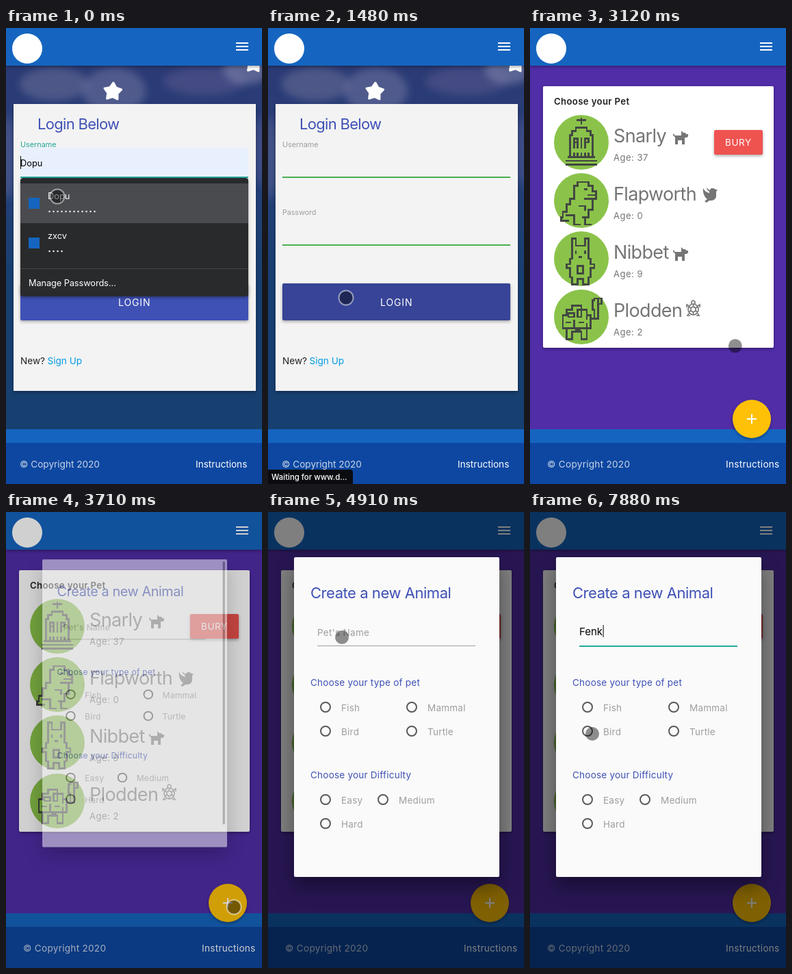
An HTML page for the animation above (8000 ms loop, 374 by 666 pixels).

```html
<!DOCTYPE html>
<html lang="en">
<head>
<meta charset="utf-8">
<title>Pet app</title>
<style>
html, body { margin: 0; width: 100%; height: 100%; overflow: hidden; background: #0d47a1; }
svg { display: block; width: 374px; height: 666px; }
text { font-family: Inter, Roboto, sans-serif; white-space: pre; }
.lift { filter: drop-shadow(0 2px 2px rgba(0,0,0,.32)); }
.high { filter: drop-shadow(0 14px 14px rgba(0,0,0,.4)); }
.pixel { fill: none; stroke: #424842; stroke-linecap: square; shape-rendering: crispEdges; }
.dots { fill: none; stroke-width: 2.7; stroke-linecap: round; stroke-dasharray: 0 6; }
</style>
</head>
<body>
<svg id="stage" viewBox="0 0 374 666"></svg>
<script>
const LOOP = 8000, STEP = 148.5;
const INDIGO = '#3f51b5', TEAL = '#26a69a', GREEN = '#4caf50';

const rect = (x, y, w, h, fill, extra = '') =>
  `<rect x="${x}" y="${y}" width="${w}" height="${h}" fill="${fill}" ${extra}/>`;
const text = (x, y, size, fill, str, spacing = 0, extra = '') =>
  `<text x="${x}" y="${y}" font-size="${size}" fill="${fill}" letter-spacing="${spacing}" ${extra}>${str}</text>`;
const group = (id, body, extra = '') => `<g id="${id}" ${extra}>${body}</g>`;
const dots = (x, y, n, color) =>
  `<path class="dots" stroke="${color}" d="M${x} ${y}h${(n - 1) * 6 + .1}"/>`;
const blob = (x, y, rx, ry, fill, opacity) =>
  `<ellipse cx="${x}" cy="${y}" rx="${rx}" ry="${ry}" fill="${fill}" opacity="${opacity}"/>`;

function star(x, y, r) {
  let d = '';
  for (let i = 0; i < 10; i++) {
    const a = i * Math.PI / 5 - 1.5, q = i % 2 ? r * .58 : r;
    d += `${i ? 'L' : 'M'}${(x + q * Math.cos(a)).toFixed(1)} ${(y + q * Math.sin(a)).toFixed(1)}`;
  }
  return `<path d="${d}z" fill="#fff" stroke="#fff" stroke-width="3" stroke-linejoin="round"/>`;
}

const footer = (left, right, spacing) =>
  text(left, 642, 13.6, '#c9d5e8', '© Copyright 2020', spacing) +
  text(right, 642, 13.6, '#fff', 'Instructions', spacing);

// Login page
const sky = rect(0, 55, 374, 531, 'url(#night)') +
  `<g filter="url(#soft)">` +
  blob(70, 82, 50, 24, '#7a7c9f', .45) + blob(158, 92, 46, 34, '#8a8bb0', .4) +
  blob(290, 78, 60, 20, '#55588e', .6) + blob(352, 60, 34, 22, '#8d90b4', .5) +
  blob(2, 190, 14, 60, '#5f6594', .5) + blob(372, 180, 12, 50, '#4d568f', .6) + '</g>' +
  star(156, 93, 13) + star(362, 52, 13);

const menu =
  rect(21, 219, 333, 173, '#292a2c', 'rx="4" class="lift"') +
  rect(21, 227, 333, 58, '#4a4b4f') + rect(21, 351, 333, 1, '#434448') +
  rect(33, 248, 16, 16, '#1565c0') + rect(33, 306, 16, 16, '#1565c0') +
  text(61, 250, 12.8, '#fff', 'Dopu') + dots(63.5, 268, 12, '#e4e4e4') +
  text(61, 308, 12.8, '#fff', 'zxcv') + dots(63.5, 326, 4, '#e4e4e4') +
  text(33, 377, 12.8, '#fff', 'Manage Passwords…', -.1);

const login = sky +
  rect(11, 111, 354, 419, '#f3f3f3', 'class="lift"') +
  text(46, 148, 22, INDIGO, 'Login Below', -.7) +
  text(21, 173.7, 10.9, '#9e9e9e', 'Username', -.05, 'id="userLabel"') +
  text(21, 272.7, 10.9, '#9e9e9e', 'Password', -.15) +
  group('userFill', rect(21, 175, 333, 42, '#e8f0fe') + text(21, 202, 12.8, '#000', 'Dopu')) +
  group('passFill', rect(21, 274, 333, 42, '#e8f0fe') + dots(23, 297, 12, '#000')) +
  rect(21, 187, 1, 19, '#000', 'id="userCaret"') +
  rect(21, 217, 333, 2, GREEN, 'id="userLine"') + rect(21, 316, 333, 2, GREEN) +
  rect(21, 373, 333, 54, INDIGO, 'id="loginBtn" rx="2" class="lift"') +
  text(164, 406, 14, '#fff', 'LOGIN', .9) +
  text(21, 491, 13.6, '#212121', 'New?') + text(60.5, 491, 13.6, '#039be5', 'Sign Up') +
  group('menu', menu);

// Pet list
const art = [
  'M0-13v3M-2-12h4M-6 8V-4h1v-2h2v-2h6v2h2v2h1V8M-4 3v-5h2v2h-2M-2 1v2M0-2v5M2 3v-5h2v2h-2' +
  'M-4 6v1M-2 6v1M0 6v1M2 6v1M4 6v1M-7 8h14M-8 10h16M-8 12h16',
  'M-4-5v-3h2v-2h6v2h2v3h2v4h-6M2-6h1M4-3h3M6-1v6h-2v4h-3M-4-5v4h-2v3h-2v4h-2v3h-1v2h4' +
  'M-1 3h3v2M-8 8h4M-4 9v4h3M2 9v4h3',
  'M-5-5v-6h2v4h5v-4h2v6v5h1v3h2v2h-2v5h-1v4h-3v-3h-3v3h-3v-4h-1v-5h-2v-2h2v-3h1zM-3-4v1M2-4v1M-1-1h1M-2 4h3v4h-3z',
  'M-10 6v-7h2v-3h3v-2h5v2h3v3h2v7zM-7-2h3v2h-3zM-2-4h2v4h-2zM3-1v2M-8 3h2M-4 2v3M-1 3h2M3 4v1' +
  'M5 1h2v-5h-1v-5h1v-1h4v3h-2v8h-2M9-9v1M-8 7v5h3v-4h5v4h3v-5M-3 7h2'
];
const icons = {
  dog: '<path d="M0 5c1-1 2 0 2 1q0 1 1 1h9V0l3 3h3l1 2h3v2q0 3-3 3h-2v10h-4v-6H7v6H3V9Q0 8 0 5z"/>',
  dove: '<path d="M1 1c2 4 5 6 9 7V6c0-3 2-5 5-5 2 0 3 1 4 2h3l-2 3v6c0 4-3 7-7 7h-3l-4 3-3-2 4-3C3 14 0 8 1 1z"/>' +
    '<path d="M6 0c0 3 2 5 4 6V4z"/>',
  turtle: '<g fill="none" stroke="#757575" stroke-width="1.6"><ellipse cx="10.500" cy="14" rx="7.500" ry="8"/>' +
    '<path d="M10.500 10l3.500 2v4l-3.500 2-3.500-2v-4zM10.500 6v4M14 12l3-2M14 16l3 2M10.500 18v4M7 16l-3 2M7 12l-3-2"/>' +
    '<path d="M8 6V3q2.500-4 5 0v3M4 9L1 7v4M17 9l3-2v4M4 20l-2 3h4M17 20l2 3h-4"/></g>'
};
const pet = (i, name, age, icon, ix, iy) => {
  const y = 167 + 85 * i;
  return `<circle cx="75" cy="${y}" r="40" fill="#8bc34a"/>` +
    `<path class="pixel" transform="translate(75 ${y}) scale(2.7)" d="${art[i]}"/>` +
    text(122, y, 27, '#757575', name, -.65) + text(122, y + 27, 13, '#757575', 'Age: ' + age, .5) +
    `<g transform="translate(${ix} ${iy})" fill="#757575">${icons[icon]}</g>`;
};

const pets = rect(0, 55, 374, 531, '#512da8') +
  rect(19, 85, 337, 382, '#fff', 'rx="2" class="lift"') +
  text(35, 112, 13.2, '#212121', 'Choose your Pet', .35, 'font-weight="600"') +
  pet(0, 'Snarly', 37, 'dog', 209, 150) + pet(1, 'Flapworth', 0, 'dove', 252, 233) +
  pet(2, 'Nibbet', 9, 'dog', 209, 320) + pet(3, 'Plodden', 2, 'turtle', 228, 397) +
  rect(269, 149, 71, 36, '#ef5350', 'rx="2" class="lift"') +
  text(285, 172, 13.5, '#fff', 'BURY', .6);

const fab = '<circle cx="324" cy="571" r="28" fill="#ffc107" class="lift"/>' +
  rect(317, 570, 14, 2, '#fff') + rect(323, 564, 2, 14, '#fff');

// New animal dialog
const radio = (x, y, label) =>
  `<circle cx="${x}" cy="${y}" r="7" fill="none" stroke="#5a5a5a" stroke-width="2"/>` +
  text(x + 23, y + 5.7, 13.5, '#9e9e9e', label, .23);

const modal = rect(38, 66, 300, 467, '#fafafa', 'rx="2" class="high"') +
  text(62, 126, 22, INDIGO, 'Create a new Animal', -.45) +
  text(72, 181, 13.5, '#9e9e9e', "Pet's Name", .3, 'id="nameLabel"') +
  rect(72, 195, 231, 1, '#9e9e9e', 'id="nameLine"') +
  text(72, 180, 15, '#000', '', 0, 'id="name"') +
  rect(72, 165, 1, 18, '#000', 'id="caret"') +
  text(62, 253.7, 13.5, INDIGO, 'Choose your type of pet', .23) +
  radio(84, 285, 'Fish') + radio(210, 285, 'Mammal') +
  radio(84, 320, 'Bird') + radio(210, 320, 'Turtle') +
  text(62, 388.7, 13.5, INDIGO, 'Choose your Difficulty', .23) +
  radio(84, 420, 'Easy') + radio(168, 420, 'Medium') + radio(84, 455, 'Hard') +
  rect(331, 69, 3.5, 427, '#8a8a8a', 'id="scroll" rx="1.7"');

document.getElementById('stage').innerHTML =
  `<defs><linearGradient id="night" x2="0" y2="1"><stop stop-color="#2b3a74"/>
  <stop offset=".25" stop-color="#27407a"/><stop offset=".6" stop-color="#173f70"/>
  <stop offset="1" stop-color="#173f70"/></linearGradient>
  <filter id="soft" x="-20%" y="-20%" width="140%" height="140%"><feGaussianBlur stdDeviation="6"/></filter></defs>` +
  group('login', login) + group('pets', pets) +
  rect(0, 0, 374, 55, '#1565c0', 'class="lift"') +
  '<circle cx="31" cy="30" r="22" fill="#fff"/>' +
  [21, 26, 31].map(y => rect(336, y, 18, 2, '#fff')).join('') +
  rect(0, 586, 374, 20, '#1565c0') + rect(0, 606, 374, 60, '#0d47a1') +
  group('loginFoot', footer(20, 277, 0)) + group('petsFoot', footer(25, 286, .27) + fab) +
  group('status', '<path d="M0 645h120q4 0 4 4v17H0z" fill="#0b0c0f"/>' +
    text(5, 660, 11.4, '#fff', 'Waiting for www.d...', 0, 'font-weight="500"')) +
  rect(0, 0, 374, 666, '#000', 'id="shade"') + group('modal', modal) +
  '<circle id="pointer" fill="#000" fill-opacity=".44" stroke="#fff" stroke-opacity=".5"/>';

const el = {};
document.querySelectorAll('[id]').forEach(e => el[e.id] = e);

const set = (id, attrs) => { for (const k in attrs) el[id].setAttribute(k, attrs[k]); };
const show = (id, on) => { el[id].style.display = on ? '' : 'none'; };
const clamp = v => Math.max(0, Math.min(1, v));
const easeOut = (u, n) => 1 - (1 - u) ** n;
const within = (t, a, b) => t >= a && t < b;

// time, x, y
const path = [
  [0, 75, 246], [200, 75, 246], [650, 88, 315], [1030, 114, 394], [2400, 114, 394],
  [2670, 190, 222], [2820, 225, 211], [3000, 272, 370], [3260, 333, 577], [3720, 333, 577],
  [4250, 200, 320], [4600, 107, 167], [4720, 107, 169], [4890, 108, 183], [7000, 108, 183],
  [7280, 135, 222], [7430, 142, 252], [7650, 118, 297], [7860, 91, 324]
];
function pointerAt(t) {
  let i = 1;
  while (i < path.length - 1 && path[i][0] < t) i++;
  const a = path[i - 1], b = path[i], u = clamp((t - a[0]) / (b[0] - a[0]));
  return [a[1] + (b[1] - a[1]) * u, a[2] + (b[2] - a[2]) * u];
}

function draw(t) {
  const listed = t >= 1780, filled = t < 1330, focused = t < 1180;
  show('login', !listed); show('loginFoot', !listed);
  show('pets', listed); show('petsFoot', listed);
  show('menu', t < 140);
  show('userFill', filled);
  show('passFill', filled && t >= 140);
  show('userCaret', focused);
  set('userCaret', { x: t < 140 ? 21 : 54 });
  set('userLabel', { fill: focused ? TEAL : '#9e9e9e' });
  set('userLine', { fill: focused ? TEAL : GREEN });
  set('loginBtn', { fill: t < 940 ? INDIGO : '#374497' });
  show('status', within(t, 1330, 2065));

  const u = clamp((t - 3661) / 250), p = easeOut(u, 3), s = .8 + .2 * p;
  show('modal', u > 0);
  set('shade', { opacity: .5 * easeOut(u, 2) });
  set('modal', {
    opacity: p,
    transform: `translate(188 ${299.5 - 40 * (1 - p)}) scale(${s}) translate(-188 -299.5)`
  });
  set('scroll', { opacity: clamp((4500 - t) / 400) });

  const active = t >= 5190;
  show('nameLabel', !active);
  set('nameLine', { fill: active ? TEAL : '#9e9e9e', height: t >= 5340 ? 2 : 1 });
  const typed = [6380, 6530, 6675, 6675].filter(at => t >= at).length;
  el.name.textContent = 'Fenk'.slice(0, typed);
  set('caret', { x: 72 + (typed ? el.name.getComputedTextLength() + .5 : 0) });
  show('caret', active && !within(t, 5640, 6080) && !within(t, 7190, 7690));

  const [x, y] = pointerAt(t);
  const down = t < 140 || within(t, 1180, 1630) || within(t, 3700, 3850) || within(t, 5190, 5340);
  set('pointer', { cx: x, cy: y, r: down ? 10.5 : 10, 'stroke-width': down ? 2 : 0 });
}

function tick(now) {
  const t = now % LOOP;
  draw(Math.floor((t + 10) / STEP) * STEP);
  requestAnimationFrame(tick);
}
requestAnimationFrame(tick);
</script>
</body>
</html>
```
